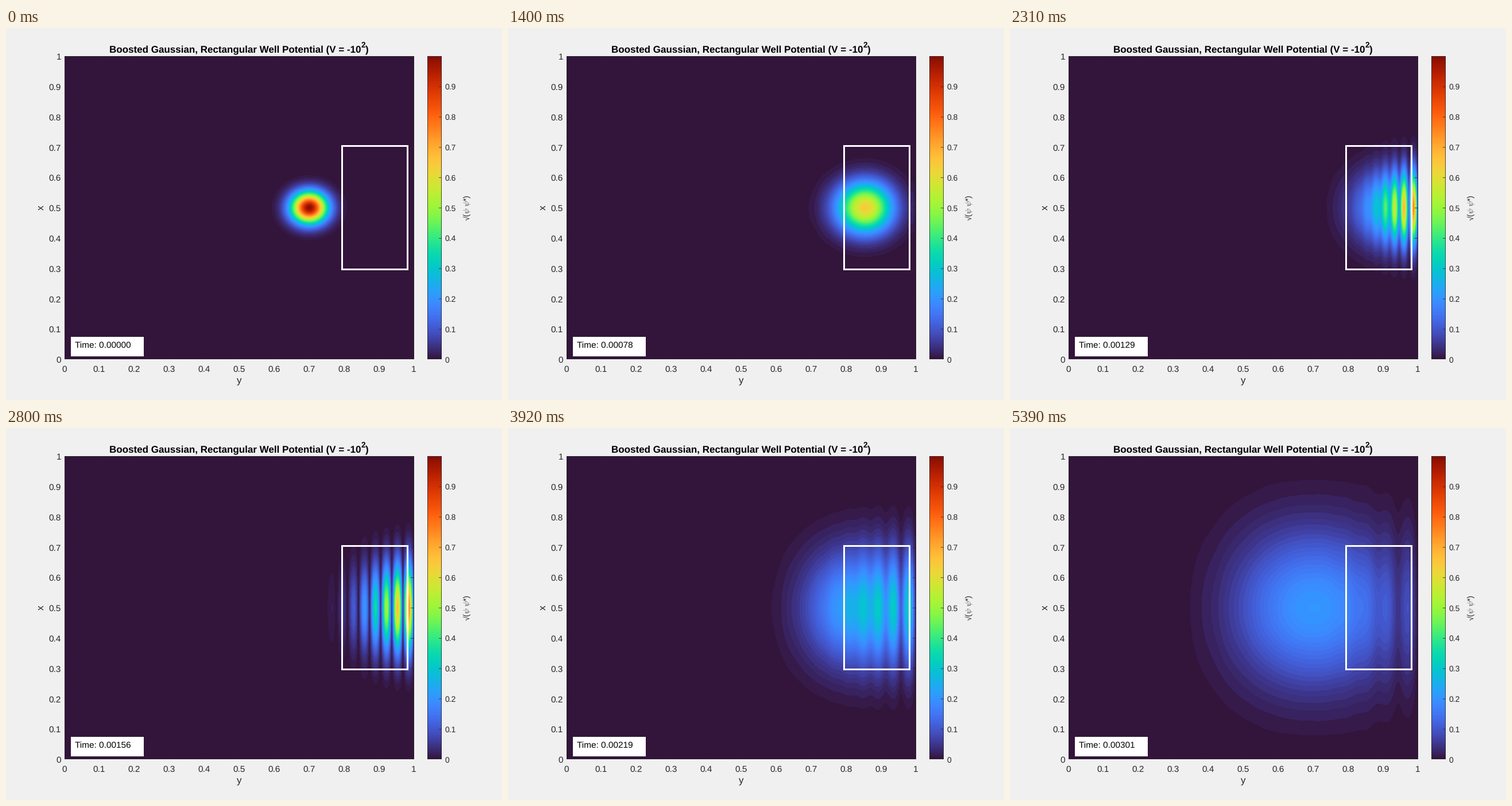
Recreate the animation shown at these times as a matplotlib script. Size 864 by 648 pixels, loop 5460 ms.

```python
import numpy as np
import matplotlib.pyplot as plt
from matplotlib.animation import FuncAnimation
from matplotlib.colors import ListedColormap
from matplotlib.patches import Rectangle

W, H = 864, 648
FRAMES, INTERVAL = 78, 70
N = 256                      # cells used to propagate the wave
FINE = 512                   # cells of the finite-difference operator
DT = 0.01 / FINE             # solver step, two per frame
LEFT, RIGHT, TOP, BOTTOM = 102, 711, 49, 577
BAR_L, BAR_R = 734, 759
STEP = 0.01                  # contour spacing
INK = "0.15"
TICK, LABEL, SMALL = 15.4, 17, 13.9

plt.rcParams.update({
    "font.family": "Liberation Sans",
    "mathtext.fontset": "cm",
    "text.hinting": "none",
    "toolbar": "None",
})


def sines(pos, k):
    return np.sqrt(2 / N) * np.sin(np.pi * np.outer(pos, k))


def simulate():
    """|psi| for every frame, walls at 0 and 1; y is sampled on the fine grid."""
    k = np.arange(1, N)
    g = k / N
    modes = sines(g, k)
    refine = (sines(np.arange(FINE + 1) / FINE, k) @ modes).T

    # Crank-Nicolson phase per mode
    half = 0.5j * DT * (2 * FINE * np.sin(np.pi * k / (2 * FINE))) ** 2
    hop = (modes * ((1 - half) / (1 + half)) ** 2) @ modes

    x, y = g[:, None], g[None, :]
    well = (abs(x - 0.5) < 0.2025) & (y > 0.795) & (y < 0.981)
    kick = np.exp(1j * DT * 100 * well)
    psi = np.exp(-((x - 0.5) ** 2 + (y - 0.7) ** 2) / 0.05 ** 2 + 100j * y)

    out = []
    for _ in range(FRAMES):
        out.append(np.pad(abs(psi @ refine), ((1, 1), (0, 0))))
        psi = kick * (hop @ (kick * psi) @ hop.T)
    return out


def lerp_matrix(n, cells):
    pos = (np.arange(n) + 0.5) / n * cells
    return np.maximum(0, 1 - abs(pos[:, None] - np.arange(cells + 1)))


waves = simulate()
peak = waves[0].max()
rows = lerp_matrix(BOTTOM - TOP, N)
cols = lerp_matrix(RIGHT - LEFT, FINE).T


def bands(i):
    z = rows @ waves[i] @ cols
    return np.floor(z / STEP) * STEP


# turbo as seen through a slightly different display profile
r, g, b = plt.get_cmap("turbo")(np.arange(256))[:, :3].T
shades = np.stack([1.1 * r - 0.1 * g, 0.08 * r + 0.92 * g, b], axis=1)
cmap = ListedColormap(np.clip(shades, 0, 1))

fig = plt.figure(figsize=(W / 72, H / 72), dpi=72, facecolor="#f0f0f0")
ax = fig.add_axes([0, 0, 1, 1])
ax.axis("off")


def show(data, box):
    return ax.imshow(data, cmap=cmap, vmin=0, vmax=peak, extent=box,
                     interpolation="nearest", aspect="auto", zorder=1)


def line(x0, y0, x1, y1):
    ax.plot([x0, x1], [y0, y1], color=INK, lw=0.8, zorder=2,
            solid_capstyle="butt", snap=False)


def frame(x0, y0, x1, y1, **style):
    ax.add_patch(Rectangle((x0, y0), x1 - x0, y1 - y0, snap=False, **style))


def label(x, y, s, size=TICK, ha="left", color=INK, **kw):
    return ax.text(x, y, s, fontsize=size, ha=ha, va=kw.pop("va", "baseline"),
                   color=color, zorder=5, **kw)


field = show(bands(0), (LEFT, RIGHT, BOTTOM, TOP))
show(np.linspace(peak, 0, 256)[:, None], (BAR_L, BAR_R, BOTTOM, TOP))
ax.set_xlim(0, W)
ax.set_ylim(H, 0)

for x0, x1 in ((LEFT, RIGHT), (BAR_L, BAR_R)):
    frame(x0 + 0.5, TOP + 0.5, x1 - 0.5, BOTTOM - 0.5,
          fill=False, ec=INK, lw=0.8, zorder=2)

for n in range(11):
    v = n / 10
    px = 101.5 + 609 * v
    py = 577.5 - 528 * v
    name = f"{v:g}"
    label(px, 598.7, name, ha="center")
    label(96, py + 5.5, name, ha="right")
    if 0 < n < 10:
        line(px, BOTTOM, px, BOTTOM - 6)
        line(px, TOP, px, TOP + 6)
        line(LEFT, py, LEFT + 6, py)
        line(RIGHT, py, RIGHT - 6, py)
        line(BAR_R, py, BAR_R - 5, py)
    if n < 10:
        label(764.5, py + 5, name, SMALL)

label(406, 619.5, "y", LABEL, "center")
label(61, 313, "x", LABEL, "center", va="center", rotation=90)
label(803, 313, r"√($\psi$ $\psi$*)", SMALL, "center", va="center",
      rotation=90)

bold = dict(color="black", weight="bold")
label(180, 42.5, "Boosted Gaussian, Rectangular Well Potential (V = -10",
      LABEL, **bold)
label(618.7, 34.5, "2", 13.6, **bold)
label(626.3, 42.5, ")", LABEL, **bold)

frame(585.5, 205.5, 699.5, 420.5, fill=False, ec="white", lw=3, zorder=3)
frame(113, 538, 240, 572, fc="white", ec="none", zorder=4)
clock = label(120, 558, "", color="black")


def update(i):
    field.set_data(bands(i))
    clock.set_text(f"Time: {2 * i * DT:.5f}")
    return field, clock


anim = FuncAnimation(fig, update, frames=FRAMES, interval=INTERVAL,
                     repeat=True, repeat_delay=0, blit=False)
plt.show()
```
